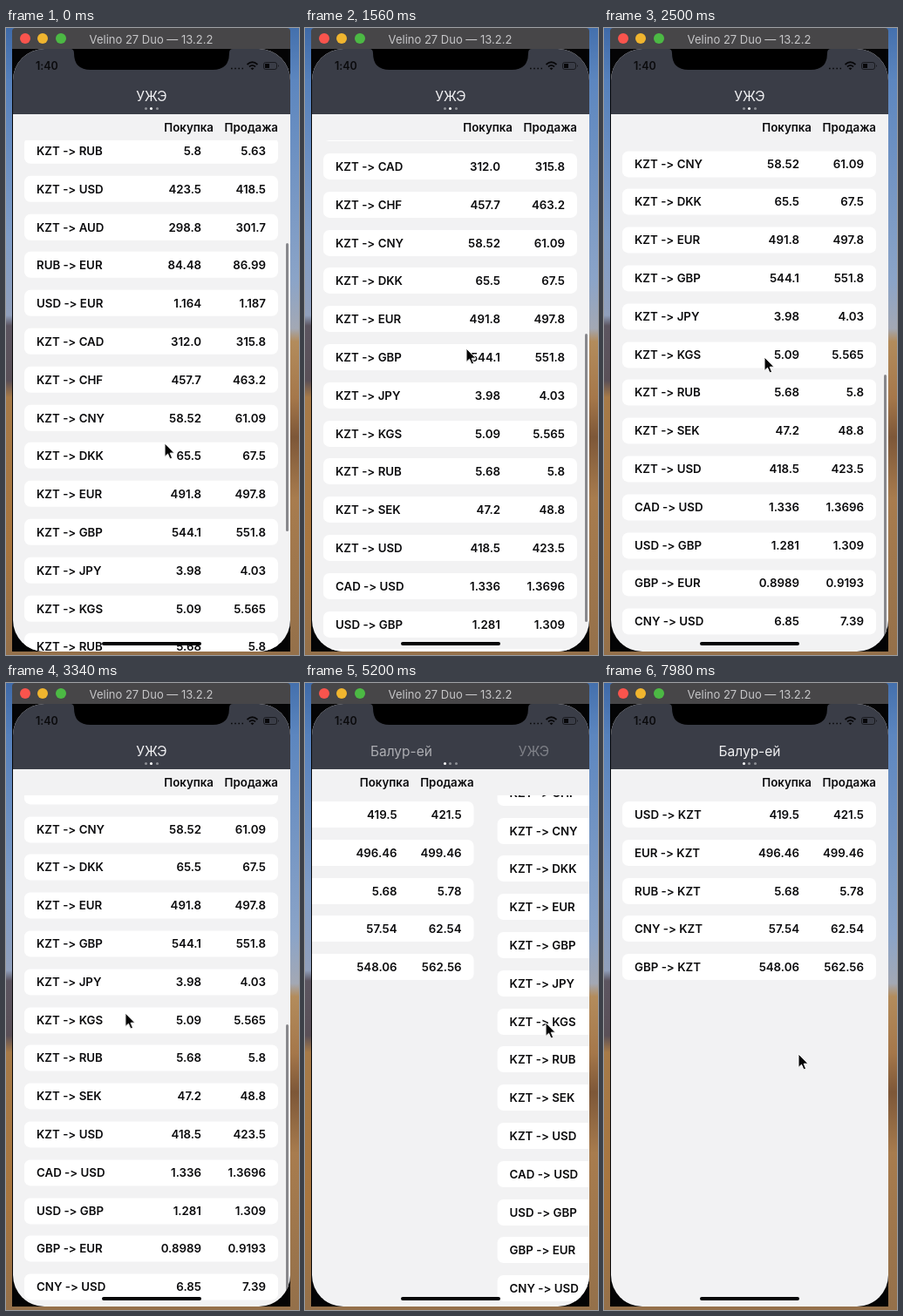
Animation, 336 px wide and 720 px high, one loop 8000 ms. Source, as an HTML page:

```html
<!DOCTYPE html>
<html lang="ru">
<head>
<meta charset="utf-8">
<title>Курсы валют</title>
<style>
@property --scroll { syntax: "<number>"; inherits: true; initial-value: 229; }
@property --page { syntax: "<number>"; inherits: true; initial-value: 0; }

html, body { margin: 0; width: 100%; height: 100%; overflow: hidden; }
#stage {
  position: relative; width: 336px; height: 720px; overflow: hidden;
  font: 600 13.3px/16px Inter, Roboto, sans-serif;
  font-feature-settings: "calt" 0, "liga" 0;
  color: #0b0b0d; white-space: nowrap;
  background: linear-gradient(#3f6aa8 0, #5580bb 60px, #7f9cc6 240px, #909fbb 330px,
    #5c5560 342px, #5a5058 405px, #a67a48 424px, #a8753e 600px, #94704a 720px);
  animation: scroll 8s infinite, page 8s infinite;
}
#stage div, #stage svg, #stage span { position: absolute; }

.wall-right { left: 326px; top: 0; width: 10px; height: 720px;
  background: linear-gradient(#4470ad 0, #5c86bf 60px, #8ba4c8 290px, #a3a8b4 345px,
    #b38c5c 360px, #a5774a 425px, #7d5738 470px, #a87c4e 540px, #94704a 720px); }
.titlebar { left: 7px; top: 0; width: 319px; height: 24px; background: #474648;
  border-radius: 4px 4px 0 0; color: #c6c6c8; font-weight: 400; font-size: 13px; }
.titlebar span { left: 0; width: 100%; top: 5px; text-align: center; }
.light { top: 6px; width: 12px; height: 12px; border-radius: 50%; }
.bezel { left: 7px; top: 24px; width: 319px; height: 692px; background: #040405; }
.screen { left: 8px; top: 24px; width: 318px; height: 692px; border-radius: 36px;
  overflow: hidden; background: #f2f2f3; }
.header { left: 0; top: 0; width: 318px; height: 75px; background: #3a3d47; }

.bank { top: 45px; width: 160px; text-align: center; font-weight: 400;
  font-size: 15.5px; line-height: 19px; color: #f0f0f2;
  transform: translateX(calc(var(--page) * 152px)); }
.bank.one { left: 79px; opacity: calc(1 - var(--page)); }
.bank.two { left: -73px; opacity: var(--page); }
.dot { top: 66.5px; width: 3px; height: 3px; border-radius: 50%; background: #fff; opacity: .42; }
.dot.first { opacity: clamp(.42, calc((var(--page) - .5) * 1000), 1); }
.dot.second { opacity: clamp(.42, calc((.5 - var(--page)) * 1000), 1); }

.pages { left: 0; top: 75px; width: 318px; height: 617px;
  transform: translateX(calc(var(--page) * 318px)); }
.page { left: 0; top: 0; width: 318px; height: 617px; }
.page.two { left: -318px; }
.view { left: 0; top: 30px; width: 318px; height: 587px; overflow: hidden; }
.rows { left: 0; top: 0; width: 318px; }
.page.one .rows { transform: translateY(calc(var(--scroll) * -1px)); }
.row { left: 13px; width: 291px; height: 30px; border-radius: 7px; background: #fff; }
.row span { top: 7px; }
.pair { left: 14px; }
.buy { right: 88px; }
.sell { right: 14px; }
.head { top: 7px; }
.bar { left: 313px; width: 2.5px; border-radius: 2px; background: #88888c;
  top: calc(var(--scroll) * .517px);
  height: min(331px, calc(585px - var(--scroll) * .517px));
  animation: fade 8s infinite; }
.home { left: 102px; top: 681px; width: 114px; height: 4px; border-radius: 2px; background: #050506; }
.cursor { left: 0; top: 0; animation: cursor 8s infinite; }

/* flick, glide, overscroll, settle */
@keyframes scroll {
  0% { --scroll: 229; animation-timing-function: linear; }
  10.5% { --scroll: 344; animation-timing-function: linear; }
  19.5% { --scroll: 430; animation-timing-function: linear; }
  28% { --scroll: 507; animation-timing-function: ease-out; }
  31.25% { --scroll: 520.6; animation-timing-function: ease-in-out; }
  41.75% { --scroll: 508.6; animation-timing-function: ease-out; }
  45%, 100% { --scroll: 507; }
}
/* the page follows the pointer, then snaps */
@keyframes page {
  0%, 57% { --page: 0; animation-timing-function: ease-in; }
  65% { --page: .626; animation-timing-function: ease-out; }
  70%, 100% { --page: 1; }
}
@keyframes fade {
  0%, 44% { opacity: 1; }
  48%, 100% { opacity: 0; }
}
@keyframes cursor {
  0% { transform: translate(181px, 476px); animation-timing-function: linear; }
  10.5% { transform: translate(184px, 364px); }
  19.5% { transform: translate(184px, 367px); }
  31.25% { transform: translate(183px, 377px); animation-timing-function: ease-in; }
  41.75% { transform: translate(136px, 378px); animation-timing-function: ease-out; }
  52%, 57% { transform: translate(76px, 384px); animation-timing-function: ease-in; }
  65% { transform: translate(275px, 389px); animation-timing-function: ease-out; }
  68% { transform: translate(290px, 391px); animation-timing-function: ease-in-out; }
  84.25% { transform: translate(231px, 399px); animation-timing-function: ease-in-out; }
  99.75%, 100% { transform: translate(222px, 425px); }
}
</style>
</head>
<body>
<div id="stage">
  <div class="wall-right"></div>
  <div class="titlebar">
    <div class="light" style="left:9px;background:#f9544d"></div>
    <div class="light" style="left:29px;background:#f0b52f"></div>
    <div class="light" style="left:50px;background:#4cb944"></div>
    <span>Velino 27 Duo — 13.2.2</span>
  </div>
  <div class="bezel"></div>
  <div class="screen">
    <div class="pages">
      <div class="page one"></div>
      <div class="page two"></div>
    </div>
    <div class="header">
      <div class="bank one">УЖЭ</div>
      <div class="bank two">Балур-ей</div>
      <div class="dot first" style="left:150.5px"></div>
      <div class="dot second" style="left:157px"></div>
      <div class="dot" style="left:163.5px"></div>
      <span style="left:26px;top:12px;font-size:12.5px">1:40</span>
    </div>
    <svg width="318" height="75" style="left:0;top:0" fill="none" stroke="#08080a">
      <path fill="#000" stroke="none" d="M66 0Q70 0 70 5Q70 24 89 24H229Q248 24 248 5Q248 0 252 0Z"/>
      <path stroke-width="1.6" stroke-dasharray="1.6 2.6" d="M250 22.5H264"/>
      <path stroke-width="1.8" d="M268.5 18Q274.5 12.5 280.5 18M271 20.5Q274.5 17.2 278 20.5"/>
      <path fill="#08080a" stroke="none" d="M272.5 22.3Q274.5 20.6 276.5 22.3L274.5 24.3Z"/>
      <rect x="287.5" y="15.5" width="15" height="8" rx="2.3" opacity=".65"/>
      <path fill="#08080a" stroke="none" d="M289 17H294V22H289ZM304 18Q305.5 19.5 304 21Z"/>
    </svg>
    <div class="home"></div>
  </div>
  <svg class="cursor" width="16" height="22" viewBox="-1 -1 16 22">
    <path d="M0 0V15.5L3.5 12.2L6 18L8.6 16.9L6.2 11.2H11Z" fill="#050505" stroke="#fff" stroke-width="1"/>
  </svg>
</div>
<script>
const rowStep = 43.8;

const mainRates = `USD KZT 419.5 421.5
EUR KZT 491.8 497.8
RUB KZT 5.68 5.8
KZT EUR 497.8 491.8
KZT GBP 551.8 544.1
KZT RUB 5.8 5.63
KZT USD 423.5 418.5
KZT AUD 298.8 301.7
RUB EUR 84.48 86.99
USD EUR 1.164 1.187
KZT CAD 312.0 315.8
KZT CHF 457.7 463.2
KZT CNY 58.52 61.09
KZT DKK 65.5 67.5
KZT EUR 491.8 497.8
KZT GBP 544.1 551.8
KZT JPY 3.98 4.03
KZT KGS 5.09 5.565
KZT RUB 5.68 5.8
KZT SEK 47.2 48.8
KZT USD 418.5 423.5
CAD USD 1.336 1.3696
USD GBP 1.281 1.309
GBP EUR 0.8989 0.9193
CNY USD 6.85 7.39`;

const shortRates = `USD KZT 419.5 421.5
EUR KZT 496.46 499.46
RUB KZT 5.68 5.78
CNY KZT 57.54 62.54
GBP KZT 548.06 562.56`;

const rowHtml = (line, i) => {
  const [from, to, buy, sell] = line.split(" ");
  return `<div class="row" style="top:${7 + i * rowStep}px">
    <span class="pair">${from} -&gt; ${to}</span>
    <span class="buy">${buy}</span><span class="sell">${sell}</span></div>`;
};

const fillPage = (selector, rates, extra = "") => {
  document.querySelector(selector).innerHTML = `
    <span class="head" style="right:88px">Покупка</span>
    <span class="head" style="right:14px">Продажа</span>
    <div class="view"><div class="rows">
    ${rates.split("\n").map(rowHtml).join("")}</div>${extra}</div>`;
};

fillPage(".page.one", mainRates, '<div class="bar"></div>');
fillPage(".page.two", shortRates);
</script>
</body>
</html>
```
